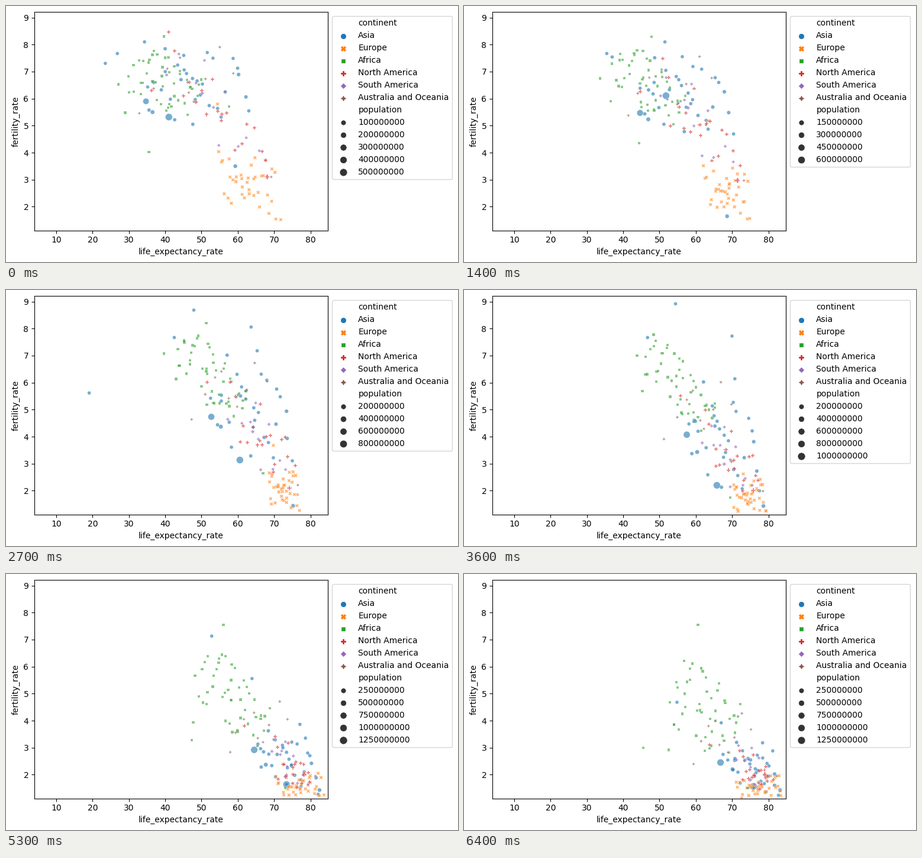
A matplotlib script for the animation above (6.5 s loop, 764 px wide and 433 px high).

```python
import numpy as np
import matplotlib.pyplot as plt
from matplotlib.animation import FuncAnimation

W, H, DPI = 764, 433, 100
FRAMES, INTERVAL = 65, 100
YEAR = np.arange(FRAMES)
T = YEAR / (FRAMES - 1)
rng = np.random.default_rng(12)

ASIA, EUROPE, AFRICA = "Asia", "Europe", "Africa"
NORTH, SOUTH, OCEANIA = "North America", "South America", "Australia and Oceania"
STYLES = {ASIA: ("C0", "o"), EUROPE: ("C1", "X"), AFRICA: ("C2", (4, 0, 45)),
          NORTH: ("C3", "P"), SOUTH: ("C4", (4, 0, 0)), OCEANIA: ("C5", (4, 1, 0))}
tracks = {name: [] for name in STYLES}


def rise(a, b, power=1.5):
    """Fast at first, slower towards the end."""
    return a + (b - a) * (1 - (1 - T) ** power)


def shift(a, b, mid, width):
    """S-shaped change from a to b, steepest at year mid."""
    s = 1 / (1 + np.exp((mid - YEAR) / width))
    return a + (b - a) * (s - s[0]) / (s[-1] - s[0])


def bump(center, width, height):
    return height * np.exp(-0.5 * ((YEAR - center) / width) ** 2)


def country(continent, life, births, share=0.01):
    """One country; share is its population relative to the largest."""
    tracks[continent].append((life, births, share + 0 * T))


def crowd(continent, n, life, births, wide, tall, tilt):
    """The many small countries, spread around a moving center."""
    us, vs = (rng.permutation(np.linspace(-1, 1, n)) for _ in range(2))
    for u, v in zip(us, vs):
        u, v = (1.1 * z * abs(z) ** 0.25 for z in (u, v))
        a, b = rng.uniform(0, 2 * np.pi, 2)
        x = life + wide * u + 0.5 * np.sin(YEAR / 7 + a)
        y = births + tall * (tilt * u + np.sqrt(1 - tilt ** 2) * v)
        country(continent, x, y + 0.07 * np.sin(YEAR / 6 + b),
                rng.exponential(0.02))


# Giants, and countries that stand apart; bumps are famines, wars and quakes
country(ASIA, rise(41, 75.9) + bump(10, 1.1, -17),
        shift(5.3, 1.57, 23, 8) + bump(15, 5, 1.6) + bump(10.3, 0.9, -2.2), 1)
country(ASIA, rise(34.7, 66.8), shift(5.9, 2.45, 36, 14), rise(0.67, 0.95))
country(ASIA, rise(36.5, 70.1), shift(5.5, 2.2, 32, 8), 0.16)
country(ASIA, rise(59.3, 83.2, 2), shift(3.5, 1.43, 4, 4), 0.12)
country(ASIA, rise(23.5, 67), shift(7.3, 3.9, 52, 5) + bump(34, 10, 1.8))
country(ASIA, rise(26.8, 54.8), shift(7.67, 4.68, 58, 3))
country(ASIA, rise(40, 67.5) + bump(27.3, 1.6, -37), shift(7, 2.75, 34, 10))
country(ASIA, rise(34.3, 78.4, 2), shift(8.1, 3.18, 46, 4))
country(ASIA, rise(45.1, 81.2), shift(7.6, 2.88, 41, 6))

country(EUROPE, rise(54.4, 77.5, 2), shift(5.8, 1.7, 26, 8))

country(AFRICA, rise(39.7, 66) + bump(42, 9, -12.5) + bump(44, 0.5, -35),
        shift(8.3, 4, 46, 5))
country(AFRICA, rise(34, 60.6, 1), shift(7.4, 7.55, 20, 5))
country(AFRICA, rise(27.1, 56.8, 1), shift(6.5, 6.2, 50, 6) + bump(30, 12, 0.6))
country(AFRICA, rise(35.5, 64), 4 + bump(34, 12, 1.4))
country(AFRICA, rise(57.6, 74.3), shift(5.7, 1.5, 22, 5))
country(AFRICA, rise(41, 45.4) + bump(33, 10, 16), shift(5.8, 3, 38, 8))

country(NORTH, rise(68.1, 79), shift(3.1, 2, 20, 3), 0.25)
country(NORTH, rise(36.2, 63.7) + bump(60, 0.3, -30), shift(6.3, 3.1, 46, 8))
country(SOUTH, rise(50.2, 75), shift(6.2, 1.8, 28, 8), 0.13)
country(OCEANIA, rise(69.2, 82.3), shift(3.1, 1.95, 22, 4))

crowd(ASIA, 28, rise(49, 75.8), shift(6.45, 2.2, 32, 9),
      rise(13, 6, 1), rise(1.2, 0.75) + bump(33, 11, 0.8), -0.5 * T ** 0.5)
crowd(EUROPE, 37, rise(63, 77.5, 2), shift(2.85, 1.55, 22, 9),
      rise(8, 5.5, 1) + bump(26, 12, -3.2), rise(1, 0.35), -0.3 + 0.6 * T)
crowd(AFRICA, 43, rise(39.5, 63) + bump(49, 8, -3.5), shift(6.6, 4.4, 45, 9),
      9.2, rise(1.05, 1.5, 1), -0.6 * np.sin(np.pi * T))
crowd(NORTH, 18, rise(54.5, 76.5), shift(5.6, 2.1, 28, 10),
      rise(12.5, 4), rise(2, 0.6, 1), -0.9 + 0.4 * T)
crowd(SOUTH, 11, rise(53, 75.5), shift(5.8, 2.35, 26, 9),
      rise(11.5, 4), rise(1.6, 0.6, 1), -0.6 + 0.2 * T)
crowd(OCEANIA, 9, rise(46, 67), shift(6.7, 3.4, 36, 10),
      rise(12, 7), rise(1, 0.8), 0.1)

# largest population, in millions
PEAK = shift(552, 1390, 25, 18)


def marker_size(share):
    return 18 + 54 * np.clip(share, 0, 1)


fig = plt.figure(figsize=(W / DPI, H / DPI), dpi=DPI)
ax = fig.add_axes([48 / W, 53.4 / H, 496 / W, 369.6 / H])
ax.set(xlim=(3.96, 84.8), ylim=(1.12, 9.21),
       xlabel="life_expectancy_rate", ylabel="fertility_rate")

data = {name: np.array(rows) for name, rows in tracks.items()}
dots, keys = {}, []
for name, (color, marker) in STYLES.items():
    dots[name] = ax.scatter([], [], color=color, marker=marker, alpha=0.6,
                            edgecolors="w", linewidths=0.34)
    keys.append(ax.scatter([], [], s=36, color=color, marker=marker,
                           linewidths=0.5))
size_keys = [ax.scatter([], [], color="0.2", linewidths=0.5) for _ in range(5)]
heading = plt.Line2D([], [], linestyle="")


def legend(peak):
    step = next(s for s in (100, 150, 200, 250) if peak <= 6 * s)
    levels = np.arange(step, peak, step)
    for key, level in zip(size_keys, levels):
        key.set_sizes([marker_size(level / peak)])
    labels = [f"{level:.0f}000000" for level in levels]
    ax.legend([heading, *keys, heading, *size_keys[:len(levels)]],
              ["continent", *STYLES, "population", *labels],
              loc="upper left", bbox_to_anchor=(1, 1))


def draw(i):
    for name, points in dots.items():
        x, y, share = data[name][:, :, i].T
        points.set_offsets(np.column_stack([x, y]))
        points.set_sizes(marker_size(share))
    legend(PEAK[i])
    return list(dots.values())


anim = FuncAnimation(fig, draw, frames=FRAMES, interval=INTERVAL,
                     init_func=lambda: draw(0), repeat=True, repeat_delay=0)
plt.show()
```
